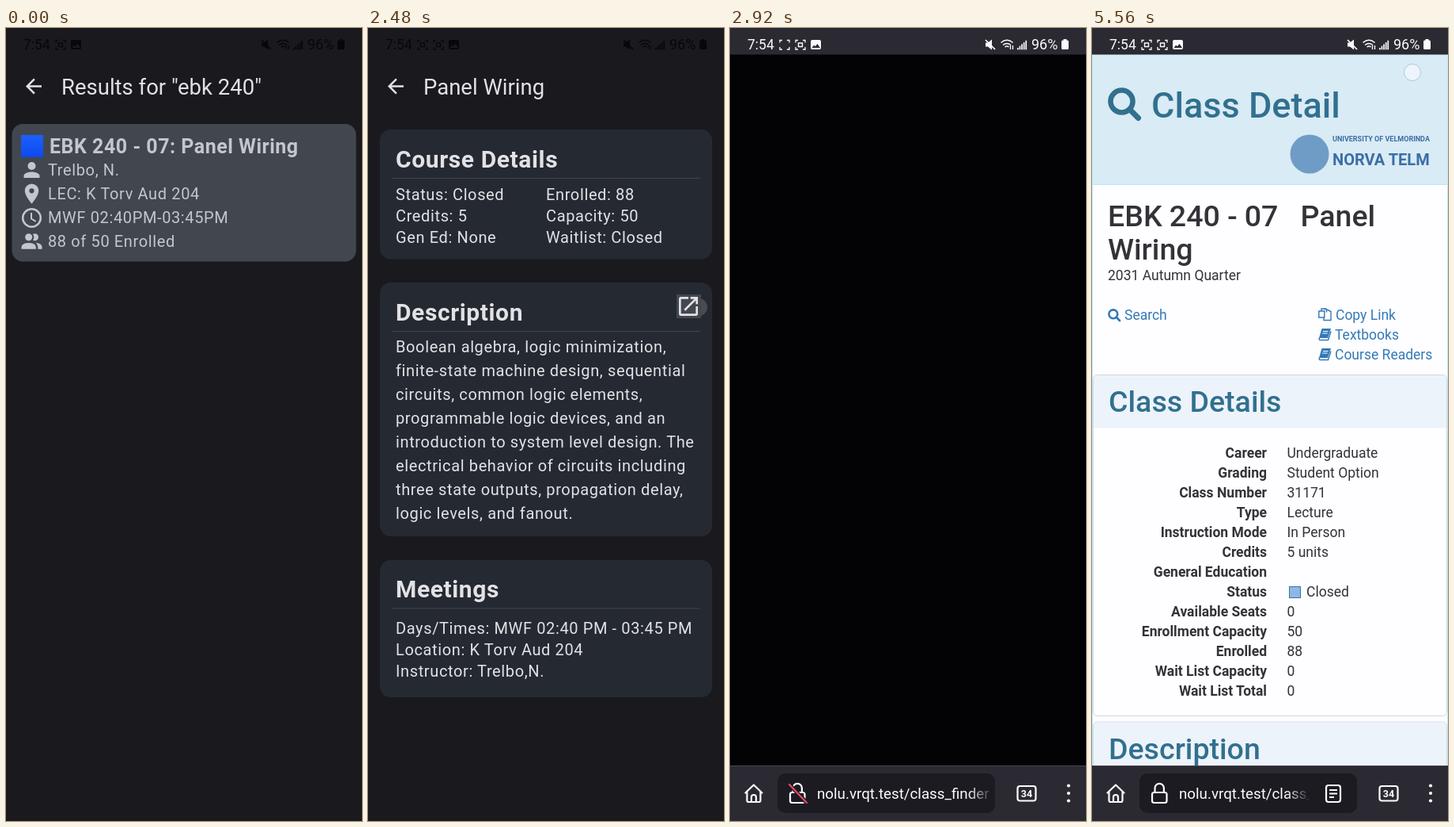
Recreate the animation shown at these times as an HTML page. Size 450 px wide and 1000 px high, loop 5.6 s.

```html
<!DOCTYPE html>
<html lang="en">
<head>
<meta charset="utf-8">
<title>Course search</title>
<style>
html, body { margin: 0; width: 100%; height: 100%; overflow: hidden; background: #191a1e; }
svg { display: block; width: 100vw; height: 100vh; font-family: Roboto, sans-serif; }
text { white-space: pre; }
</style>
</head>
<body>
<svg id="stage" viewBox="0 0 450 1000" xmlns="http://www.w3.org/2000/svg"></svg>
<script>
const LOOP = 5600;
const stage = document.getElementById('stage');

// Markup helpers
const text = (x, y, size, fill, str, more = '') =>
  `<text x="${x}" y="${y}" font-size="${size}" fill="${fill}" ${more}>${str}</text>`;
const rect = (x, y, w, h, fill, more = '') =>
  `<rect x="${x}" y="${y}" width="${w}" height="${h}" fill="${fill}" ${more}/>`;
const icon = (x, y, scale, fill, d) =>
  `<path transform="translate(${x} ${y}) scale(${scale})" fill="${fill}" fill-rule="evenodd" d="${d}"/>`;
const line = (d, width, more = '') =>
  `<path d="${d}" fill="none" stroke="currentColor" stroke-width="${width}" ${more}/>`;
const group = (id, body, more = '') => `<g id="${id}" ${more}>${body}</g>`;

const BOLD = 'font-weight="700"', MEDIUM = 'font-weight="500"';
const SPACED = 'letter-spacing=".625"';
const INK = '#e2e2e6', SOFT = '#c3c6cf';
const COURSE = 'EBK 240 - 07', TITLE = 'Panel Wiring';

const ARROW = 'M20 11H7.83L13.42 5.41 12 4 4 12 12 20 13.41 18.59 7.83 13H20Z';
const PERSON = 'M12 4a4 4 0 0 1 0 8a4 4 0 0 1 0-8M12 14c4.42 0 8 1.79 8 4v2H4v-2c0-2.21 3.58-4 8-4Z';
const PIN = 'M12 11.5a2.5 2.5 0 0 1 0-5a2.5 2.5 0 0 1 0 5M12 2a7 7 0 0 0-7 7c0 5.25 7 13 7 13s7-7.75 7-13a7 7 0 0 0-7-7Z';
const PEOPLE = 'M16 17v2H2v-2s0-4 7-4 7 4 7 4M12.5 7.5A3.5 3.5 0 1 0 9 11a3.5 3.5 0 0 0 3.5-3.5M15.94 13A5.32 5.32 0 0 1 18 17v2h4v-2s0-3.63-6.06-4M15 4a3.39 3.39 0 0 0-1.93.59 5 5 0 0 1 0 5.82A3.39 3.39 0 0 0 15 11a3.5 3.5 0 0 0 0-7Z';
const OPEN = 'M14 3v2h3.59L7.76 14.83l1.41 1.41L19 6.41V10h2V3M19 19H5V5h7V3H5a2 2 0 0 0-2 2v14a2 2 0 0 0 2 2h14a2 2 0 0 0 2-2v-7h-2Z';

function resultsScreen() {
  const rows = ['Trelbo, N.', 'LEC: K Torv Aud 204', 'MWF 02:40PM-03:45PM', '88 of 50 Enrolled'];
  return text(70, 84, 27.5, INK, 'Results for "ebk 240"') +
    rect(7.5, 121, 435, 173.5, '#42474f', 'rx="14"') +
    `<g clip-path="url(#cardClip)"><circle id="ripple" cx="240" cy="215" fill="#fff"/></g>` +
    rect(19, 135, 28, 28, 'url(#blue)') +
    text(55, 158, 25, SOFT, `${COURSE}: ${TITLE}`, BOLD + ' letter-spacing=".5"') +
    rows.map((row, i) => text(53, 186 + 30 * i, 20, SOFT, row, SPACED)).join('') +
    icon(17.5, 164, 1.25, SOFT, PERSON) + icon(17.5, 194, 1.25, SOFT, PIN) +
    `<g color="${SOFT}"><circle cx="32.5" cy="239.5" r="11.3" fill="none" stroke="${SOFT}" stroke-width="2.5"/>` +
    line('M32 233v7.5l5.6 3.4', 2) + '</g>' +
    icon(17, 254, 1.3, SOFT, PEOPLE);
}

function detailScreen() {
  const card = (y, h, base, title) => rect(15, y, 420, h, '#252a32', 'rx="14"') +
    text(35, base, 30, INK, title, BOLD + ' letter-spacing=".6"') +
    rect(30, base + 13.5, 390, 1, '#45434f');
  const rows = (x, y, step, list) =>
    list.map((row, i) => text(x, y + step * i, 20, INK, row, SPACED)).join('');
  return text(70, 84, 27.5, INK, TITLE) +
    card(128, 163.5, 175.5, 'Course Details') +
    rows(35, 216.5, 27, ['Status: Closed', 'Credits: 5', 'Gen Ed: None']) +
    rows(225, 216.5, 27, ['Enrolled: 88', 'Capacity: 50', 'Waitlist: Closed']) +
    card(321, 320, 368.5, 'Description') +
    '<circle id="tap" cx="418" cy="352" r="11" fill="#4a4b53"/>' +
    rect(390, 336, 31, 30, '#44474e', 'id="press"') +
    icon(389, 335, 1.333, INK, OPEN) +
    rows(35, 409, 30, ['Boolean algebra, logic minimization,', 'finite-state machine design, sequential',
      'circuits, common logic elements,', 'programmable logic devices, and an',
      'introduction to system level design. The', 'electrical behavior of circuits including',
      'three state outputs, propagation delay,', 'logic levels, and fanout.']) +
    card(671, 173, 718, 'Meetings') +
    rows(35, 764, 27, ['Days/Times: MWF 02:40 PM - 03:45 PM', 'Location: K Torv Aud 204', 'Instructor: Trelbo,N.']);
}

function webPage() {
  const teal = '#31708f', link = '#337ab7', dark = '#333238';
  const search = (x, y, k) => `<g transform="translate(${x} ${y}) scale(${k})">` +
    '<circle cx="17.5" cy="17.5" r="14" fill="none" stroke="currentColor" stroke-width="6.6"/>' +
    line('M27.5 27.5L38.5 38.5', 7, 'stroke-linecap="round"') + '</g>';
  const book = y => `<g transform="translate(286 ${y})"><path d="M4.5 0H16L12 12H1Z" fill="${link}"/>` +
    line('M1.5 11.5q-1 3 1 3H12.5L16 3.5', 1.5) +
    `<path d="M6 3.5h6.5M5.2 6h6.5" stroke="#fff" stroke-width="1"/></g>`;
  const facts = [['Career', 'Undergraduate'], ['Grading', 'Student Option'], ['Class Number', '31171'],
    ['Type', 'Lecture'], ['Instruction Mode', 'In Person'], ['Credits', '5 units'], ['General Education', ''],
    ['Status', 'Closed'], ['Available Seats', '0'], ['Enrollment Capacity', '50'], ['Enrolled', '88'],
    ['Wait List Capacity', '0'], ['Wait List Total', '0']];
  const panel = (y, h, title) => rect(1.5, y + .5, 447, h, '#fefdff', 'rx="5" stroke="#d3d6e2"') +
    `<path d="M2 ${y + 67}V${y + 6}q0-5 5-5H443q5 0 5 5V${y + 67}Z" fill="#edf3fb"/>` +
    text(21, y + 47, 37.5, teal, title, MEDIUM);
  return rect(0, 33, 450, 900, '#fefdff') +
    rect(.5, 33.5, 449, 900, 'none', 'stroke="#bce8f1"') +
    rect(.5, 33.5, 449, 164, '#d9ebf5', 'stroke="#bce8f1"') +
    `<g color="${teal}">${search(20, 75, 1)}</g>` +
    text(75, 113, 45, teal, 'Class Detail', MEDIUM) +
    '<circle cx="275" cy="159" r="24.5" fill="#6f9cc6"/>' +
    text(304, 143, 9, '#3b6ea5', 'UNIVERSITY OF VELMORINDA', BOLD) +
    text(304, 173, 20, '#3b6ea5', 'NORVA TELM', BOLD) +
    text(20, 250, 37.5, dark, `${COURSE}\u00a0\u00a0\u00a0Panel`, MEDIUM) +
    text(20, 291.5, 37.5, dark, 'Wiring', MEDIUM) +
    text(20, 318, 17.5, dark, '2031 Autumn Quarter') +
    `<g color="${link}">${search(20, 354, .39)}` +
    line('M286.8 357h7v8h-7zM293 354.5h3.5v4M290 357v-3h5l7 3.5v11h-9v-4', 1.4) +
    book(379) + book(404) + '</g>' +
    text(41, 368, 17.5, link, 'Search') + text(308, 368, 17.5, link, 'Copy Link') +
    text(307, 393, 17.5, link, 'Textbooks') + text(307, 418, 17.5, link, 'Course Readers') +
    panel(437, 430, 'Class Details') +
    facts.map(([name, value], i) => {
      const y = 541.5 + 25 * i;
      return text(221, y, 17.5, dark, name, BOLD + ' text-anchor="end"') +
        text(name === 'Status' ? 271 : 246.5, y, 17.5, dark, value);
    }).join('') +
    rect(249.5, 704.5, 14, 14, '#8db8e6', 'stroke="#3f6f9f"') +
    panel(874.5, 200, 'Description') +
    '<circle id="pageTap" cx="405" cy="56" r="10.5" fill="#edf4fb" stroke="#abcae3"/>';
}

function toolbar() {
  const cap = 'stroke-linecap="round" stroke-linejoin="round"';
  return rect(0, 930, 450, 80, '#2b2a33') + rect(0, 930, 450, 1, '#45444f') +
    group('track', rect(0, 930, 450, 4, '#403f49') + rect(0, 930, 0, 4, 'url(#bar)', 'id="bar"')) +
    line('M19.5 964.5L30 954.5 40.5 964.5M21.5 963v11q0 2 2 2h13q2 0 2-2v-11M27 976v-6q0-3 3-3t3 3v6', 2.2, cap) +
    rect(60, 940, 275, 50, '#1c1b22', 'rx="10"') +
    rect(76, 964, 18.5, 13, 'none', 'rx="2.5" stroke="#fbfbfe" stroke-width="2.2"') +
    line('M79.5 963.5v-5a5.7 5.7 0 0 1 11.4 0v5', 2.2) +
    group('slash', '<path d="M75 954L97 977" stroke="#1c1b22" stroke-width="5"/>' +
      '<path d="M75 954L97 977" stroke="#e8496c" stroke-width="2.2" stroke-linecap="round"/>') +
    `<g clip-path="url(#urlClip)">${text(110, 972, 18.75, '#fbfbfe', 'nolu.vrqt.test/class_finder')}</g>` +
    rect(300, 945, 34, 40, 'url(#fade)') +
    group('shortUrl', rect(245, 945, 31, 40, 'url(#fade)') + rect(275, 945, 59, 40, '#1c1b22')) +
    group('reader', rect(296, 955, 18, 21, 'none', 'rx="3" stroke="#fbfbfe" stroke-width="2.2"') +
      line('M300 961h10M300 965.5h10M300 970h6', 1.9)) +
    rect(363.5, 956, 23, 18.5, 'none', 'rx="3" stroke="#fbfbfe" stroke-width="2.2"') +
    text(375, 969.8, 12.5, '#fbfbfe', '34', BOLD + ' text-anchor="middle"') +
    [955.5, 965, 974.5].map(y => `<circle cx="428" cy="${y}" r="2.1" fill="#fbfbfe"/>`).join('');
}

function statusBar() {
  const corners = x => line(`M${x + 3.5} 15.5h-3v3M${x + 9.5} 15.5h3v3M${x + 3.5} 27h-3v-3M${x + 9.5} 27h3v-3`, 1.3);
  const inner = x => line(`M${x + 4} 19h5v4.5h-5z`, 1.4);
  const signal = [0, 1, 2, 3, 4].map(i =>
    rect(363 + 2.6 * i, 25 - 2.3 * i, 1.7, 2.3 + 2.3 * i, 'currentColor')).join('');
  return text(22, 27, 17.5, 'currentColor', '7:54') +
    corners(62.5) + group('blink', inner(62.5)) +
    group('second', corners(82.5) + inner(82.5)) +
    group('photo', '<path fill="currentColor" fill-rule="evenodd" d="M104 15h9q2 0 2 2v8q0 2-2 2h-9q-2 0-2-2v-8q0-2 2-2M103.5 25h10.5l-3.5-5-2.7 3.2-1.6-1.7z"/>') +
    '<path fill="currentColor" d="M323 18.5h3l5-4v13l-5-4h-3z"/>' + line('M323 15l12 12', 1.7) +
    line('M342.5 18.5q7.5-6.5 15 0M345 21.5q5-4 10 0M347.5 24q2.5-2 5 0', 1.6) +
    line('M354.5 22v5M357.5 22v5', 1.3) + signal +
    text(381, 27, 18, 'currentColor', '96%') +
    '<path fill="currentColor" d="M421.5 14h4v1.5h1q1.5 0 1.5 1.5v8.5q0 1.5-1.5 1.5h-6q-1.5 0-1.5-1.5V17q0-1.5 1.5-1.5h1z"/>';
}

stage.innerHTML = `<defs>
  <clipPath id="cardClip">${rect(7.5, 121, 435, 173.5, '#000', 'rx="14"')}</clipPath>
  <clipPath id="urlClip">${rect(60, 940, 274, 50, '#000')}</clipPath>
  <linearGradient id="blue" x2="0" y2="1"><stop stop-color="#1c60ff"/><stop offset="1" stop-color="#0d49ec"/></linearGradient>
  <linearGradient id="fade"><stop stop-color="#1c1b22" stop-opacity="0"/><stop offset="1" stop-color="#1c1b22"/></linearGradient>
  <linearGradient id="bar"><stop stop-color="#6c55f5"/><stop offset=".3" stop-color="#a63bc4"/>
    <stop offset=".5" stop-color="#e51f80"/><stop offset=".8" stop-color="#fb3d51"/><stop offset="1" stop-color="#ff9a55"/></linearGradient>
  </defs>` +
  rect(0, 0, 450, 1000, '#1a1a1e') +
  group('app', icon(20, 58.5, 1.25, INK, ARROW) + group('results', resultsScreen()) + group('detail', detailScreen())) +
  rect(0, 0, 450, 1000, '#000', 'id="dim"') +
  group('browser', rect(0, 33, 450, 900, '#000', 'id="body"') + group('page', webPage()) +
    rect(0, 0, 450, 33.5, '#2b2a33') + toolbar(), 'color="#fbfbfe"') +
  group('status', statusBar());

const el = {};
stage.querySelectorAll('[id]').forEach(node => el[node.id] = node);

const ramp = (t, a, b) => Math.min(1, Math.max(0, (t - a) / (b - a)));
const mix = (a, b, k) => a + (b - a) * k;
const set = (id, name, value) => el[id].setAttribute(name, value);
const show = (id, k) => {
  set(id, 'opacity', +k);
  set(id, 'visibility', k > 0 ? 'visible' : 'hidden');
};

function draw(t) {
  // Results card press, then the course screen
  const grow = ramp(t, 160, 480);
  set('ripple', 'r', 240 * (1 - (1 - grow) ** 2));
  show('ripple', grow > 0 ? .1 : 0);
  show('results', 1 - ramp(t, 520, 720));
  show('detail', ramp(t, 740, 960));
  show('tap', ramp(t, 2200, 2280) * (1 - ramp(t, 2500, 2600)));
  show('press', ramp(t, 2280, 2440) * (1 - ramp(t, 2500, 2620)));

  // Browser window slides in, halving its distance every 40 ms
  const offset = t < 2880 ? Math.min(100, 10 * 2 ** ((2720 - t) / 40)) : 0;
  const slide = 1 - offset / 100;
  set('app', 'transform', `translate(0 ${-32.8 * slide})`);
  show('dim', .13 * slide);
  show('browser', ramp(t, 2580, 2680));
  set('browser', 'transform', `translate(0 ${offset})`);
  show('body', ramp(t, 2740, 2880));
  const lit = ramp(t, 3000, 3200);
  set('body', 'fill', `rgb(${mix(3, 42, lit)},${mix(3, 40, lit)},${mix(5, 46, lit)})`);

  // Page load
  show('slash', t < 3440);
  show('track', t >= 3440 && t < 4520);
  set('bar', 'width', mix(112.5, 450, ramp(t, 3920, 4480)));
  show('page', t >= 3960);
  const readable = ramp(t, 4560, 4680);
  show('shortUrl', readable);
  show('reader', t < 3400 ? .35 * (1 - ramp(t, 2720, 2800)) : readable);
  show('pageTap', ramp(t, 5080, 5200));

  // Status bar
  set('status', 'color', t >= 2640 ? '#fbfbfe' : '#08080a');
  show('blink', Math.floor((t + 920) / 520) % 2 === 0 || t < 640);
  const extra = t >= 480;
  show('second', extra);
  set('photo', 'transform', `translate(${extra ? 0 : -20} 0)`);
}

const start = performance.now();
function tick() {
  draw((performance.now() - start) % LOOP);
  requestAnimationFrame(tick);
}
tick();
</script>
</body>
</html>
```
